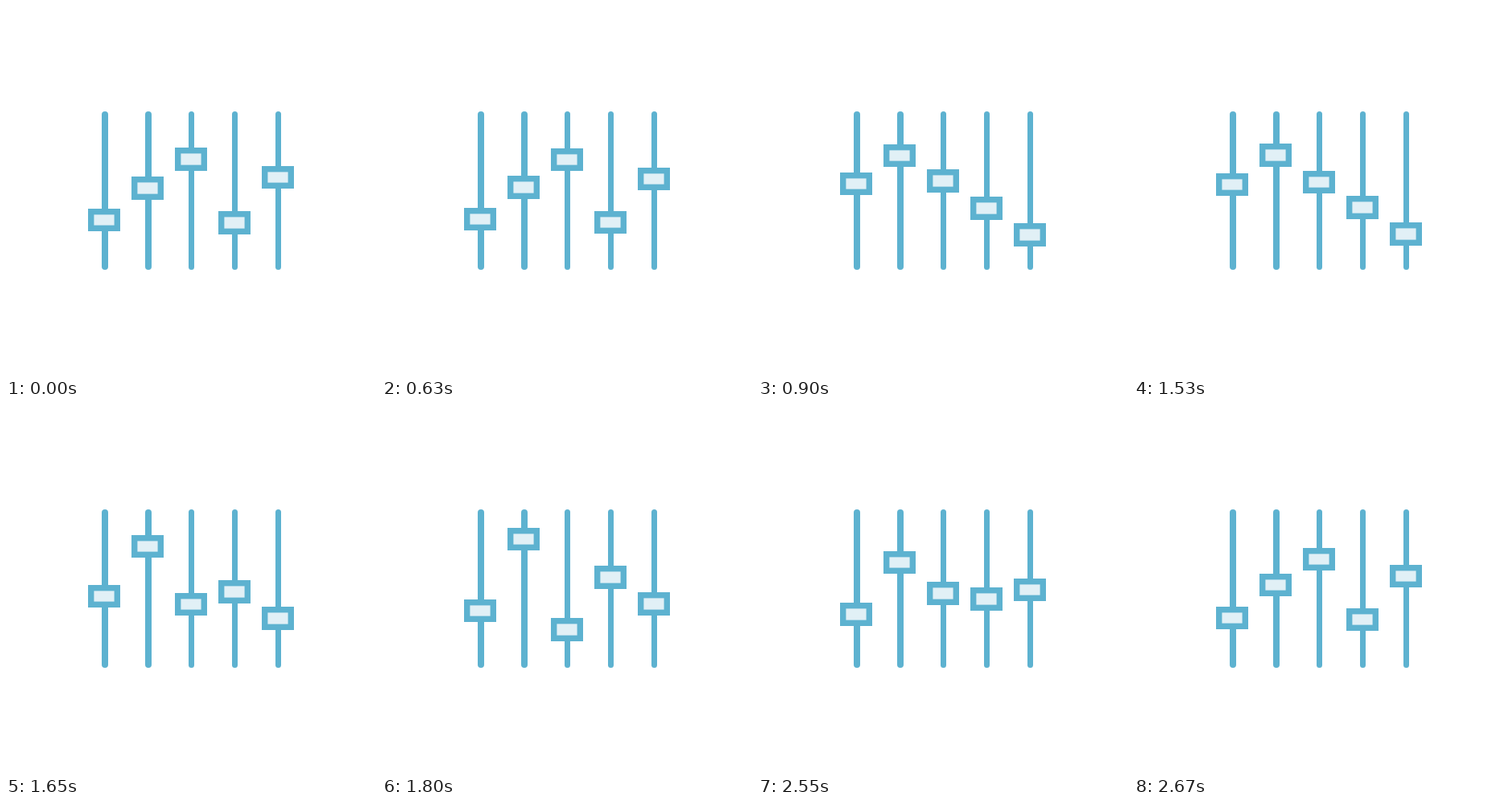
An HTML page for the animation above (2700 ms loop, 460x460 px).

```html
<!DOCTYPE html>
<html lang="en">
<head>
<meta charset="utf-8">
<title>Sliders</title>
<style>
  html, body { margin: 0; width: 100%; height: 100%; overflow: hidden; background: #fff; }
  svg { display: block; width: 100%; height: 100%; }
  line { stroke: #5db2d0; stroke-linecap: round; }
  rect { fill: #e1f0f6; stroke: #5db2d0; }
</style>
</head>
<body>
<svg id="stage" viewBox="0 0 460 460"></svg>
<script>
const STEP = 30, PHASE = 30, HOLD = 20;   // ms per step; steps per phase and per hold
const LEFT = 102, GAP = 54, TOP = 131, BOTTOM = 328;
const KNOB_W = 40, KNOB_H = 28.4, EDGE = 7.4;

// each slider: the knob's centre at its three rests
const sliders = [
  [266, 221, 257],
  [226.5, 186, 168],
  [190.5, 217.5, 280.4],
  [269.5, 251.5, 215.5],
  [213, 284.6, 248.6]
];

const stage = document.getElementById('stage');
function add(tag, attrs) {
  const el = document.createElementNS('http://www.w3.org/2000/svg', tag);
  for (const key in attrs) el.setAttribute(key, attrs[key]);
  return stage.appendChild(el);
}

const knobs = sliders.map((_, i) => {
  const left = LEFT + GAP * i;
  const w = i < 2 ? 8 : 7;
  const x = left + 17 + w / 2;
  add('line', { x1: x, x2: x, y1: TOP + w / 2, y2: BOTTOM - w / 2, 'stroke-width': w });
  return add('rect', { x: left + EDGE / 2, width: KNOB_W - EDGE, 'stroke-width': EDGE });
});

const ease = u => u * u * (3 - 2 * u);

// outer edges sit on whole pixels
function place(knob, y) {
  const top = Math.round(y - KNOB_H / 2);
  const bottom = Math.round(y + KNOB_H / 2);
  knob.setAttribute('y', top + EDGE / 2);
  knob.setAttribute('height', bottom - top - EDGE);
}

function draw(ms) {
  const step = Math.floor(ms / STEP + 1e-6);
  const phase = Math.floor(step / PHASE);
  const k = ease(Math.max(0, step % PHASE - HOLD + 1e-9) / (PHASE - HOLD));
  sliders.forEach((rests, i) => {
    const from = rests[phase % 3], to = rests[(phase + 1) % 3];
    place(knobs[i], from + (to - from) * k);
  });
}

let start = null;
function tick() {
  const now = performance.now();
  if (start === null) start = now;
  draw(now - start);
  requestAnimationFrame(tick);
}
draw(0);
requestAnimationFrame(tick);
</script>
</body>
</html>
```
